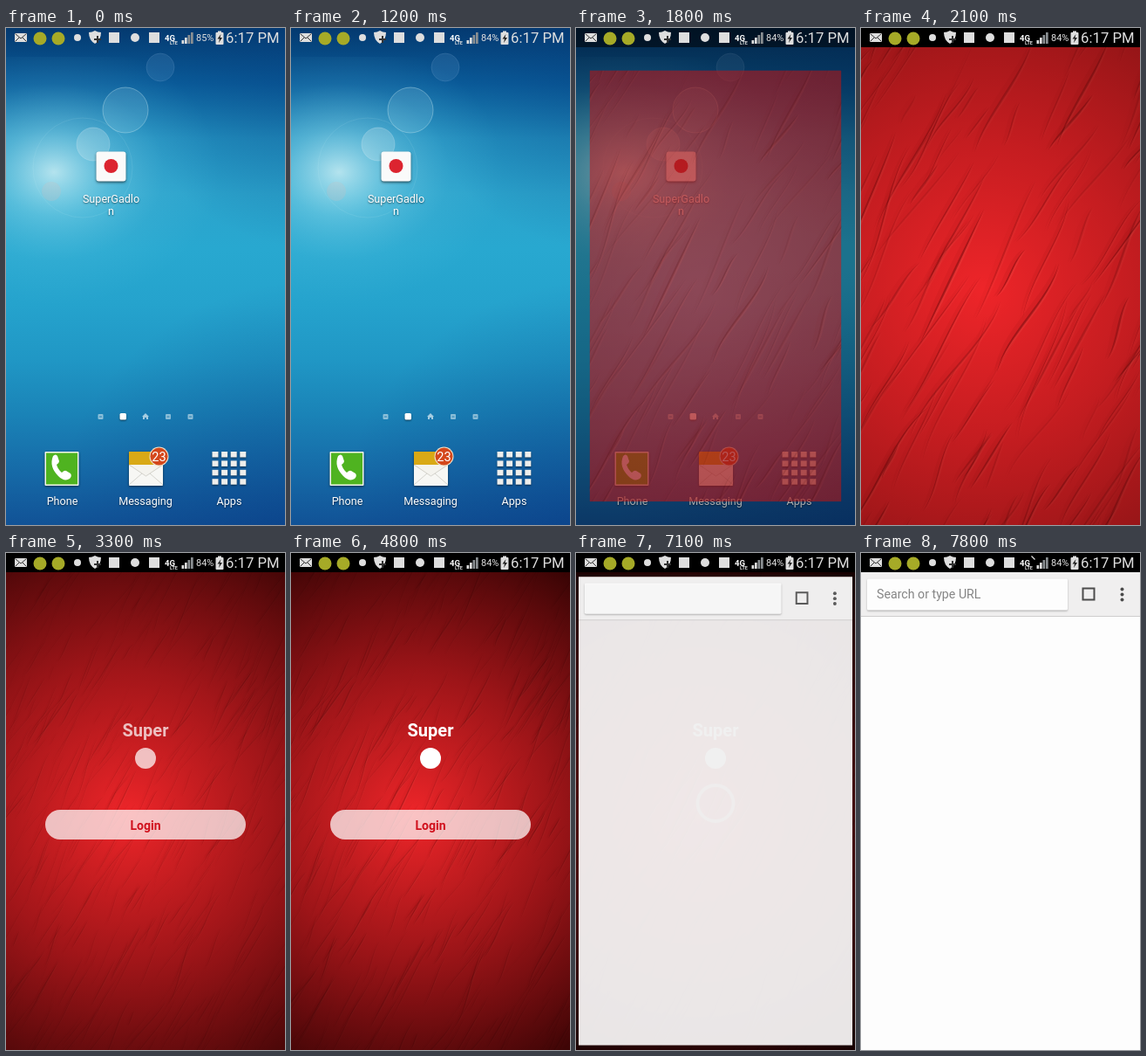
Recreate the animation shown at these times as an HTML page with a canvas. Size 320x569 px, loop 8 s.

```html
<!DOCTYPE html>
<html lang="en">
<head>
<meta charset="utf-8">
<style>
html, body { margin: 0; width: 100%; height: 100%; overflow: hidden; background: #000; }
canvas { display: block; }
</style>
</head>
<body>
<canvas id="stage" width="320" height="569"></canvas>
<script>
const W = 320, H = 569, BAR = 22, LOOP = 8000;
const c = document.getElementById('stage').getContext('2d');

// Each splash step holds until the next: start, zoom, fold strength, vignette, content alpha
const STEPS = [
  [2100, 1.45, .75, .38, 0],
  [2500, 1.3, .65, .45, 0],
  [3300, .75, .4, .72, .72],
  [4000, .79, .48, .75, 1],
  [4800, .83, .55, .78, 1],
  [5500, .87, .62, .8, 1],
  [6200, .9, .7, .82, 1]
];
const SPIN_START = 5500;

let seed = 17;
function rand(a, b) {
  seed = (seed * 16807) % 2147483647;
  return a + (b - a) * seed / 2147483647;
}
const folds = Array.from({ length: 520 }, () => ({
  x: rand(-220, 300), y: rand(-460, 380), len: rand(25, 130),
  angle: rand(1.9, 2.25), bend: rand(-.09, .09), width: rand(.5, 1.6), alpha: rand(.2, .8)
}));

function rect(x, y, w, h, fill, r = 0) {
  c.fillStyle = fill;
  c.beginPath();
  c.roundRect(x, y, w, h, r);
  c.fill();
}
function circle(x, y, r, fill) {
  c.fillStyle = fill;
  c.beginPath();
  c.arc(x, y, r, 0, 7);
  c.fill();
}
function ring(x, y, r, color, width = 1) {
  c.strokeStyle = color;
  c.lineWidth = width;
  c.beginPath();
  c.arc(x, y, r, 0, 7);
  c.stroke();
}
function path(d, fill, stroke, width = 1) {
  const p = new Path2D(d);
  if (fill) { c.fillStyle = fill; c.fill(p); }
  if (stroke) { c.strokeStyle = stroke; c.lineWidth = width; c.stroke(p); }
}
function text(s, x, y, size, fill, align = 'center', weight = 400) {
  c.font = `${weight} ${size}px Roboto, sans-serif`;
  c.textAlign = align;
  c.fillStyle = fill;
  c.fillText(s, x, y);
}
function radial(x, y, r, ...colors) {
  const g = c.createRadialGradient(x, y, 0, x, y, r);
  colors.forEach((k, i) => g.addColorStop(i / (colors.length - 1), k));
  c.fillStyle = g;
  c.fillRect(0, 0, W, H);
}
function withAlpha(a, draw) {
  c.save();
  c.globalAlpha *= a;
  draw();
  c.restore();
}
function shadow(blur, y, draw) {
  c.save();
  c.shadowColor = 'rgba(0,0,0,.55)';
  c.shadowBlur = blur;
  c.shadowOffsetY = y;
  draw();
  c.restore();
}

function statusBar(t) {
  const ink = '#dedede';
  path('M10 6h14v10h-14z', ink);
  path('M10.5 6.5l6.5 5.5L23.5 6.5M10.5 15.5l4.5-4.5M23.5 15.5l-4.5-4.5', null, '#333');
  circle(39, 12, 7.5, '#a6aa27');
  circle(60, 12, 7.5, '#a6aa27');
  circle(82, 11, 4, ink);
  path('M95 5q4 0 7-2q3 2 7 2q0 9-7 13q-7-4-7-13z', ink);
  path('M105 9v8M101 13h8', null, '#333', 2);
  rect(118, 5, 12, 12, ink);
  circle(148, 11, 5, ink);
  rect(164, 5, 12, 12, ink);
  text('4G', 188, 14.5, 9.5, '#fff', 'center', 700);
  text('LTE', 192.5, 18.5, 5.5, ink, 'center', 700);
  for (let i = 0; i < 4; i++) {
    const h = 4 + i * 3;
    rect(201.5 + i * 3.5, 18 - h, 2.7, h, i < 2 ? ink : '#8a8f92');
  }
  if (t >= 7400) path('M195.5 3.5l4 4', null, ink, 1.2);
  text(t < 100 ? '85%' : '84%', 218, 15, 11, ink, 'left');
  rect(240.5, 5, 9, 14, ink, 1);
  rect(243, 3.5, 4, 2, ink);
  path('M246.5 7l-4 5.5h2.5l-1 4.5l4-6h-2.5z', '#222');
  text('6:17 PM', 313.5, 17, 16.7, ink, 'right');
}

function wallpaper() {
  const stops = ['#04396f', '#0a5c9a', '#228fbf', '#2ba3cc', '#28a8d0', '#25a3cd',
    '#2097c5', '#1a83b7', '#166ba8', '#115296'];
  const g = c.createLinearGradient(0, 0, 0, H);
  stops.forEach((k, i) => g.addColorStop(i / 9, k));
  c.fillStyle = g;
  c.fillRect(0, 0, W, H);
  radial(350, 590, 300, 'rgba(5,50,125,.45)', 'rgba(5,50,125,0)');
  radial(340, 60, 190, 'rgba(5,60,125,.35)', 'rgba(5,60,125,0)');
  // The glow fades out above the horizon
  c.save();
  c.translate(0, 165);
  c.scale(1, .8);
  c.translate(0, -165);
  radial(55, 165, 190, 'rgba(215,245,248,.8)', 'rgba(150,225,240,.42)', 'rgba(110,205,230,.12)', 'rgba(100,200,230,0)');
  c.restore();
  circle(177, 45, 16, 'rgba(80,140,190,.25)');
  ring(177, 45, 16, 'rgba(130,170,210,.2)');
  circle(137, 94, 26, 'rgba(150,210,230,.2)');
  ring(137, 94, 26, 'rgba(200,230,240,.38)');
  circle(100, 133, 19, 'rgba(215,235,240,.25)');
  ring(100, 133, 19, 'rgba(225,240,245,.25)');
  circle(52, 187, 11, 'rgba(205,190,190,.25)');
  ring(88, 160, 57, 'rgba(210,240,245,.1)');
}

function label(s, x, y) {
  shadow(2, 1, () => text(s, x, y, 12.6, '#fff'));
}

function home() {
  wallpaper();
  shadow(3, 1.5, () => rect(103.5, 141.5, 34, 34, '#fafafa', 3));
  circle(120.5, 158, 8, '#dc2430');
  label('SuperGadlo', 120.5, 200);
  label('n', 120.5, 213.5);

  [108.5, 186, 211.5].forEach(x => {
    rect(x - 3, 442, 6, 6, 'rgba(215,235,242,.6)', 1);
    rect(x - 1.5, 444, 3, 2, 'rgba(40,130,180,.5)');
  });
  shadow(2, 1, () => rect(130.5, 441, 7.5, 7.5, '#fff', 1.5));
  path('M156 445l4-4l4 4h-1v3h-2v-2h-2v2h-2v-3z', 'rgba(225,240,245,.7)');

  shadow(3, 1, () => rect(44.5, 485, 39, 39, '#f3f6ee', 1));
  rect(46, 486.5, 36, 36, '#4fb320');
  path('M54 490q3-3 5 0l2 6q0 2-3 4q2 6 6 9q3-3 5-2l5 3q2 3-1 6q-6 4-13-3q-11-11-6-23z', '#fff');

  shadow(3, 1, () => rect(141, 485, 39, 39, '#f7f7f4', 1));
  path('M141 485h39v15l-19.5 12l-19.5-12z', '#d9a916');
  path('M141 500h39l-19.5 13z', '#f4f3ee');
  path('M141 500l19.5 13l19.5-13M141 523l15-13M180 523l-15-13', null, '#c6c5bd', .7);
  circle(175.5, 490.5, 11, '#eee0c8');
  circle(175.5, 490.5, 10, '#d4481c');
  text('23', 175.5, 495.5, 14.5, '#fff');

  shadow(2, 1, () => {
    for (let i = 0; i < 16; i++) {
      rect(236.5 + i % 4 * 10.6, 485 + (i >> 2) * 10.4, 7, 6.5, '#eeeeec');
    }
  });
  label('Phone', 64.5, 546);
  label('Messaging', 160, 546);
  label('Apps', 256, 546);
}

// A tapered sliver around a slightly curved spine
function sliver(f, shift, width, fill) {
  const dx = Math.cos(f.angle), dy = Math.sin(f.angle);
  const at = (along, off) => [f.x + shift + dx * along * f.len - dy * off, f.y + dy * along * f.len + dx * off];
  const b = f.bend * f.len;
  c.fillStyle = fill;
  c.beginPath();
  c.moveTo(...at(0, 0));
  c.bezierCurveTo(...at(.3, b + width), ...at(.7, width - b), ...at(1, 0));
  c.bezierCurveTo(...at(.7, -width - b), ...at(.3, b - width), ...at(0, 0));
  c.fill();
}

function splash(t) {
  const [, zoom, depth, dark, alpha] = STEPS.findLast(s => t >= s[0]) || STEPS[0];
  c.fillStyle = '#ee2529';
  c.fillRect(0, 0, W, H);
  c.save();
  c.translate(W / 2, 290);
  c.scale(zoom, zoom);
  folds.forEach(f => withAlpha(f.alpha * depth, () => {
    sliver(f, -2, f.width * 2.6, 'rgba(120,0,5,.13)');
    sliver(f, 1.4, f.width, 'rgba(255,105,95,.32)');
    sliver(f, 0, f.width * .75, 'rgba(75,0,5,.6)');
  }));
  c.restore();
  radial(140, 300, 330, 'rgba(45,0,0,0)', `rgba(55,0,3,${dark * .58})`, `rgba(35,0,0,${dark * 1.15})`);

  if (!alpha) return;
  withAlpha(alpha, () => {
    text('Super', 160, 210, 20, '#fff', 'center', 700);
    circle(160, 235, 12, '#fff');
  });
  if (t < SPIN_START) {
    rect(45, 294, 230, 34, 'rgba(255,255,255,.72)', 17);
    text('Login', 160, 316.5, 14, '#d0101c', 'center', 700);
  } else {
    ring(160, 286.5, 20.5, 'rgba(215,190,190,.9)', 3.8);
  }
}

function browser(t) {
  rect(0, BAR, W, H - BAR, '#fdfdfd');
  rect(0, BAR, W, 50, '#f0efef');
  rect(0, 72, W, 1, '#cfcdcd');
  c.save();
  c.shadowColor = 'rgba(0,0,0,.3)';
  c.shadowBlur = 2;
  c.shadowOffsetY = 1;
  rect(7, 29.5, 230, 36, '#fdfdfd', 1.5);
  c.restore();
  if (t >= 7700) {
    withAlpha(t < 7800 ? .5 : 1, () => text('Search or type URL', 18, 52, 14.2, '#858585', 'left'));
  }
  path('M254.5 40.5h13v13h-13z', null, '#4c4c4c', 2);
  [41.5, 47.5, 53.5].forEach(y => circle(299.5, y, 2, '#4c4c4c'));
}

// Opening a window: grow and fade in over a dimmed backdrop, in 100 ms steps
function open(t, start, draw) {
  const k = Math.min(5, Math.floor((t - start) / 100) + 1);
  const p = 1 - (1 - k / 5) ** 1.5;
  const s = .79 + .21 * p, cy = (BAR + H) / 2;
  rect(0, 0, W, H, `rgba(0,0,0,${.6 * p})`);
  rect(0, 0, W, BAR, `rgba(0,0,0,${p})`);
  c.save();
  c.translate(W / 2, cy);
  c.scale(s, s);
  c.translate(-W / 2, -cy);
  c.beginPath();
  c.rect(0, BAR, W, H - BAR);
  c.clip();
  c.globalAlpha = p;
  draw(t);
  c.restore();
}

function render(t) {
  if (t < 2100) {
    home();
    if (t >= 1700) open(t, 1700, splash);
  } else if (t < 7200) {
    splash(t);
    rect(0, 0, W, BAR, '#000');
    if (t >= 6800) open(t, 6800, browser);
  } else {
    browser(t);
    rect(0, 0, W, BAR, '#000');
  }
  statusBar(t);
}

const begin = performance.now();
function tick() {
  render((performance.now() - begin) % LOOP);
  requestAnimationFrame(tick);
}
tick();
</script>
</body>
</html>
```
